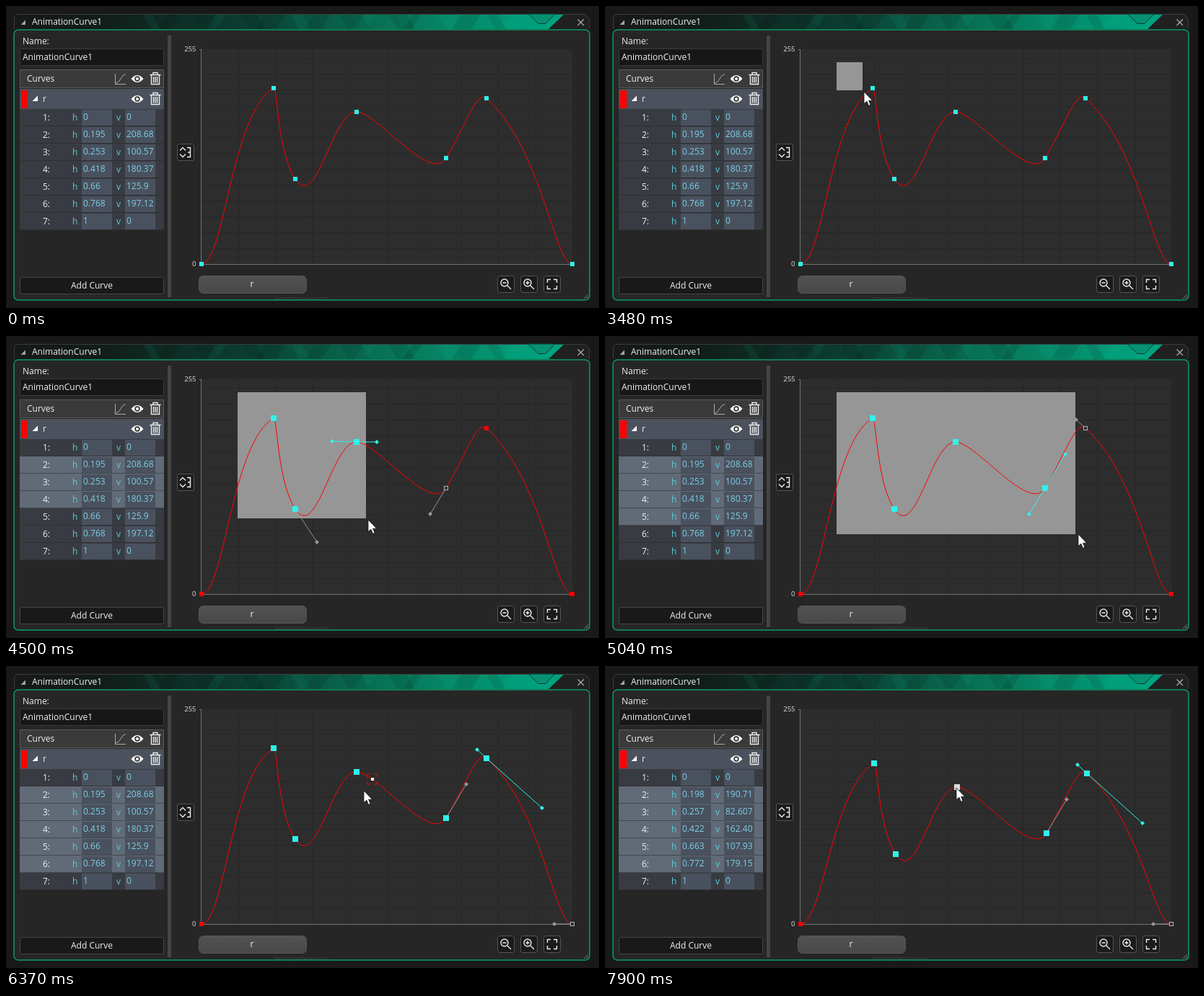
Recreate the animation shown at these times as an HTML page. Size 822x419 px, loop 7990 ms.

```html
<!DOCTYPE html>
<html lang="en">
<head>
<meta charset="utf-8">
<title>Animation curve editor</title>
<style>
html, body { margin: 0; width: 100%; height: 100%; overflow: hidden; background: #191919; }
svg { display: block; width: 822px; height: 419px; }
text { font: 12px "Open Sans", "Noto Sans", sans-serif; fill: #f0f0f0; white-space: pre; }
.key { fill: #5ccbd6; }
.val { fill: #7ccfe6; }
.axis { font-size: 9.5px; fill: #e4e4e4; }
.line { fill: none; stroke: #eee; stroke-width: 1.4; }
</style>
</head>
<body>
<svg id="stage" viewBox="0 0 822 419">
  <defs>
    <linearGradient id="bar">
      <stop offset="0" stop-color="#171918"/>
      <stop offset=".15" stop-color="#111d19"/>
      <stop offset=".4" stop-color="#0b3d31"/>
      <stop offset=".65" stop-color="#087457"/>
      <stop offset=".92" stop-color="#00a37f"/>
    </linearGradient>
    <linearGradient id="tab" x2="0" y2="1">
      <stop offset="0" stop-color="#525252"/>
      <stop offset="1" stop-color="#484848"/>
    </linearGradient>
    <clipPath id="barClip"><path d="M11 32V18Q11 11 18 11H802L809 18V32Z"/></clipPath>
    <g id="eye">
      <path d="M-8.500 0Q0-10 8.500 0Q0 10-8.500 0Z" fill="#fff"/>
      <circle r="3.700" fill="#333"/><circle r="2" fill="#fff"/>
    </g>
    <g id="trash" class="line">
      <path d="M-7.500-5.500H7.500M-3-6V-8.500H3V-6M-5.500-5V7.500H5.500V-5M-2.500-3V5.500M0-3V5.500M2.500-3V5.500"/>
    </g>
  </defs>
  <g id="back"></g>
  <g id="list"></g>
  <g id="plot"></g>
  <path id="cursor" d="M0 0V16.500L3.900 13.200L6.500 19.300L9.100 18.200L6.600 12.200H11.700Z" fill="#fff" stroke="#111" stroke-width=".8"/>
</svg>
<script>
const LOOP = 7990;
const CYAN = '#2ff2ea', RED = '#ff0000', GRAY = '#969696';
const el = id => document.getElementById(id);
const rect = (x, y, w, h, fill, more = '') =>
  `<rect x="${x}" y="${y}" width="${w}" height="${h}" fill="${fill}" ${more}/>`;
const path = (d, more = 'class="line"') => `<path d="${d}" ${more}/>`;
const label = (x, y, s, more = '') => `<text x="${x}" y="${y}" ${more}>${s}</text>`;
const use = (id, x, y) => `<use href="#${id}" x="${x}" y="${y}"/>`;
const box = (x, y, w, h, fill, edge, r = 2) =>
  rect(x + .5, y + .5, w - 1, h - 1, fill, `rx="${r}" stroke="${edge}"`);

// position, offsets of the left and right handles, values
const POINTS = [
  { x: 271, y: 358, l: [0, 0], r: [32, 0], h: 0, v: 0 },
  { x: 371, y: 114, l: [-59, 34], r: [5, -3], h: .195, v: 208.6802 },
  { x: 401, y: 240, l: [-25, -38], r: [30, 46], h: .2534, v: 100.577 },
  { x: 486, y: 147, l: [-34, -1], r: [28, 0], h: .4185, v: 180.3702 },
  { x: 610, y: 211, l: [-22, 36], r: [28, -47], h: .66, v: 125.9 },
  { x: 666, y: 128, l: [-13, -12], r: [77, 69], h: .7685, v: 197.1202 },
  { x: 785, y: 358, l: [-25, 0], r: [0, 0], h: 1, v: 0 }
];

// screen updates: start, count, index of the one short step
const RUNS = [
  [650, 10, 4], [1520, 4, 9], [2500, 4, 9], [3300, 10, 5], [4170, 10, 3],
  [5040, 8, 4], [5920, 8, 9], [6830, 2, 9], [7480, 6, 3]
];

// cursor path: time, x, y
const TRACK = [
  [650, 528, 304], [890, 468, 236], [1160, 392, 158], [1430, 340, 110],
  [1790, 320, 100], [2410, 320, 100], [2770, 321, 78], [3210, 321, 78],
  [3480, 359, 119], [4080, 430, 203], [4500, 502, 255], [4770, 580, 270],
  [5040, 656, 275], [5640, 687, 280], [5830, 687, 280], [6370, 496, 173],
  [6550, 484, 150], [6740, 484, 150], [6920, 485, 148], [7390, 485, 148],
  [7900, 487, 169]
];
const PRESS = [321, 78], GRAB = [485, 148];
const DRAG_FROM = 3300, DRAG_TO = 5920, MOVE_FROM = 7480;

function snap(t) {
  let last = 0;
  for (const [start, count, short] of RUNS)
    for (let k = 0; k < count; k++) {
      const s = start + 90 * k - (k > short ? 30 : 0);
      if (s <= t) last = s;
    }
  return last;
}

function cursorAt(t) {
  const i = TRACK.findIndex(k => k[0] >= t);
  if (i < 0) return TRACK[TRACK.length - 1].slice(1);
  if (i === 0) return TRACK[0].slice(1);
  const [ta, xa, ya] = TRACK[i - 1], [tb, xb, yb] = TRACK[i];
  const p = (t - ta) / (tb - ta);
  return [xa + (xb - xa) * p, ya + (yb - ya) * p];
}

const tip = (p, side) => [p.x + p[side][0], p.y + p[side][1]];
const dist = (x, y, a, b) => Math.hypot(x - a, y - b);

function nearest(pts, x, y) {
  let best = { d: 1e9 };
  for (let i = 1; i < pts.length; i++) {
    const a = pts[i - 1], b = pts[i], c = tip(a, 'r'), e = tip(b, 'l');
    for (let k = 0; k <= 60; k++) {
      const u = k / 60, w = 1 - u;
      const mix = (p, q, r, s) => w * w * w * p + 3 * w * w * u * q + 3 * w * u * u * r + u * u * u * s;
      const px = mix(a.x, c[0], e[0], b.x), py = mix(a.y, c[1], e[1], b.y);
      const d = dist(px, py, x, y);
      if (d < best.d) best = { d, x: px, y: py };
    }
  }
  return best;
}

function drawBack() {
  let s = rect(11, 33, 798, 375, '#262626', 'rx="6" stroke="#0b9a68" stroke-width="1.5"');

  // title bar
  s += '<g clip-path="url(#barClip)">' + rect(11, 11, 798, 21, 'url(#bar)');
  for (let i = 0; i < 16; i++) {
    const x = 190 + i * 34, w = 12 + i * 7 % 19;
    s += path(`M${x} 11h${w}l${i % 2 ? -14 : 12} 21h${-w}Z`,
      `fill="${i % 3 ? '#000' : '#12c79b'}" opacity="${i % 3 ? .1 : .08}"`);
  }
  s += path('M752 32L774 11H809V32Z', 'fill="#202020"') + '</g>';
  s += path('M11.500 32V18Q11.500 11.500 18 11.500H802L808.500 18V32', 'fill="none" stroke="#3c3c3c"');
  s += path('M724 11L738 24.500H748L761 11Z', 'fill="#079172" stroke="#073b30"');
  s += path('M27 19.500V26H20.500Z', 'fill="#a5a5a5"') + label(36, 26, 'AnimationCurve1');
  s += path('M792.500 18.500L801 27M801 18.500L792.500 27', 'stroke="#aaa" stroke-width="1.3"');

  // left panel
  s += label(23, 53, 'Name:') + box(19, 59, 200, 24, '#171717', '#3a3a3a') + label(23, 75, 'AnimationCurve1');
  s += box(19, 88, 200, 26, '#3a3a3a', '#585858', 0) + label(29, 105, 'Curves');
  s += path('M151.500 94V108.500H166', 'fill="none" stroke="#aaa"');
  s += path('M152 107Q157 106 159 101T166 94.500', 'fill="none" stroke="#aaa"');
  s += rect(19, 115, 200, 28, '#4c525d') + rect(21, 117, 9, 25, RED);
  s += path('M44 124.500V132H36.500Z', 'fill="#fff"') + label(51, 133, 'r');
  for (const y of [101, 129]) s += use('eye', 182, y) + use('trash', 207, y);
  s += box(19, 376, 200, 24, '#191919', '#474747') + label(119, 392, 'Add Curve', 'text-anchor="middle"');
  s += rect(224, 41, 5, 363, '#454545');

  // graph
  s += rect(271, 60, 514, 298, '#2d2d2d');
  let grid = '';
  for (let i = 1; i < 10; i++) grid += `M${Math.round(271 + 51.5 * i) - .5} 60V358`;
  for (let y = 336.5; y > 60; y -= 22) grid += `M271 ${y}H785`;
  s += path(grid, 'stroke="#262626"');
  s += path('M268 60.500H271M270.500 60V358.500H785', 'fill="none" stroke="#737373"');
  s += label(263.5, 63, '255', 'class="axis" text-anchor="end"');
  s += label(263.5, 361, '0', 'class="axis" text-anchor="end"');

  // buttons
  s += box(237, 191, 24, 24, '#1c1c1c', '#555');
  s += path('M241 200.500L245 196.500L249 200.500M241 205.500L245 209.500L249 205.500M251 196.500H255.500V209.500H251M252 203H255');
  s += box(267, 374, 150, 25, 'url(#tab)', '#565656', 6) + label(341, 390, 'r', 'text-anchor="middle"');
  for (const x of [681, 713, 745]) s += box(x, 374, 24, 24, '#1b1b1b', '#555', 3);
  for (const x of [691, 723])
    s += `<circle cx="${x}" cy="384" r="5" class="line"/>` + path(`M${x + 4} 388L${x + 9} 393M${x - 2.5} 384H${x + 2.5}`);
  s += path('M723 381.500V386.500');
  s += path('M750.500 384V379.500H755M759 379.500H763.500V384M763.500 388V392.500H759M755 392.500H750.500V388');
  s += path('M372 404.500H448M374 406.500H448', 'stroke="#606060" stroke-dasharray="1 3"');
  s += path('M801 406L807 400M804 406L807 403', 'stroke="#777"');
  el('back').innerHTML = s;
}

function drawList(selected, dx, dy) {
  let s = '';
  POINTS.forEach((p, i) => {
    const y = 143 + 24 * i, on = selected.includes(i), moved = on && (dx || dy);
    const h = moved ? (p.h + dx * .0019).toFixed(5) : String(p.h);
    const v = moved ? (p.v - dy * 17.97 / 21 + 1e-4).toFixed(5) : String(p.v);
    s += rect(19, y, 200, 23.5, on ? '#616a77' : '#383b41');
    s += rect(105, y + 1, 42, 22, '#4a515e') + rect(165, y + 1, 42, 22, '#4a515e');
    s += label(51, y + 16, i + 1 + ':');
    s += label(92, y + 16, 'h', 'class="key"') + label(153, y + 16, 'v', 'class="key"');
    s += label(107, y + 15, h.slice(0, 5), 'class="val"') + label(167, y + 15, v.slice(0, 6), 'class="val"');
  });
  el('list').innerHTML = s;
}

function handle(p, side, color) {
  const [x, y] = tip(p, side);
  return path(`M${p.x} ${p.y}L${x} ${y}`, `stroke="${color}"`) +
    path(`M${x - 3} ${y}l3-3l3 3l-3 3Z`, `fill="${color}"`);
}

function square(p, i, selected, last, hot) {
  const at = (n, fill) => rect(p.x - n / 2, p.y - n / 2, n, n, fill);
  if (selected.includes(i)) return at(8, hot ? '#dcdcdc' : CYAN);
  if (last < 0) return at(6, hot ? '#dcdcdc' : CYAN);
  if (Math.abs(i - last) === 1) return rect(p.x - 2.5, p.y - 2.5, 5, 5, '#2b2b2b', 'stroke="#b4b4b4"');
  return at(6, RED);
}

function drawPlot(t, pts, selected, cur, corner) {
  const last = selected.length ? selected[selected.length - 1] : -1;
  const dragging = t >= DRAG_FROM && t < DRAG_TO;
  const live = t >= 650 && !dragging;
  const hot = live ? pts.findIndex(p => dist(p.x, p.y, ...cur) < 14) : -1;
  let s = '';
  if (dragging) s += rect(...PRESS, corner[0] - PRESS[0], corner[1] - PRESS[1], GRAY);

  let d = `M${pts[0].x} ${pts[0].y}`;
  for (let i = 1; i < pts.length; i++)
    d += `C${tip(pts[i - 1], 'r')} ${tip(pts[i], 'l')} ${pts[i].x} ${pts[i].y}`;
  s += path(d, `fill="none" stroke="${RED}"`);

  if (last > 0) {
    s += handle(pts[last - 1], 'r', GRAY) + handle(pts[last + 1], 'l', GRAY);
    s += handle(pts[last], 'l', CYAN) + handle(pts[last], 'r', CYAN);
  }
  pts.forEach((p, i) => { s += square(p, i, selected, last, i === hot); });

  const near = live && hot < 0 ? nearest(pts, ...cur) : { d: 99 };
  if (near.d < 30) {
    const x = Math.round(near.x), y = Math.round(near.y);
    s += `<g transform="translate(${x} ${y})">` + rect(-2, -2, 4, 4, '#f4f4f4') +
      path('M-7-3V-7H-3M3-7H7V-3M7 3V7H3M-3 7H-7V3', `fill="none" stroke="${RED}"`) + '</g>';
  }
  el('plot').innerHTML = s;
}

function draw(time) {
  const t = snap(time);
  const cur = cursorAt(t).map(Math.round);
  const corner = cursorAt(Math.min(t, DRAG_TO - 90) - 15).map(Math.round);
  const selected = [];
  if (t >= DRAG_FROM) POINTS.forEach((p, i) => {
    if (p.x > PRESS[0] && p.x < corner[0] && p.y < corner[1]) selected.push(i);
  });
  const [dx, dy] = t >= MOVE_FROM ? [cur[0] - GRAB[0], cur[1] - GRAB[1]] : [0, 0];
  const pts = POINTS.map((p, i) => selected.includes(i) ? { ...p, x: p.x + dx, y: p.y + dy } : p);

  drawList(selected, dx, dy);
  drawPlot(t, pts, selected, cur, corner);
  el('cursor').setAttribute('transform', `translate(${cur})`);
  el('cursor').setAttribute('visibility', t < 650 ? 'hidden' : 'visible');
}

drawBack();
draw(0);
const begin = performance.now();
(function tick() {
  draw((performance.now() - begin) % LOOP);
  requestAnimationFrame(tick);
})();
</script>
</body>
</html>
```
